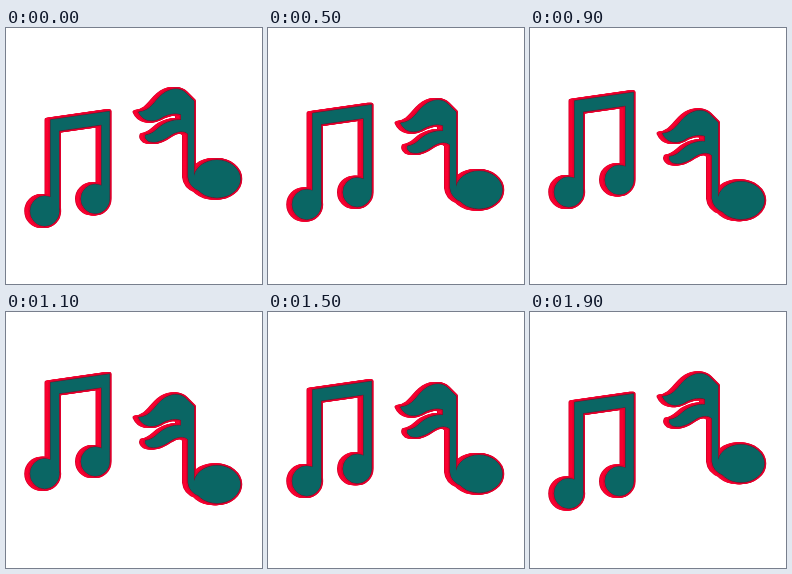
An HTML page with a canvas that plays this animation: 256 by 256 pixels, repeating every 2 s.

```html
<!DOCTYPE html>
<html lang="en">
<head>
<meta charset="utf-8">
<title>Bobbing notes</title>
<style>
  html, body { margin: 0; width: 100%; height: 100%; overflow: hidden; background: #fff; }
  canvas { display: block; width: 256px; height: 256px; }
</style>
</head>
<body>
<canvas id="stage" width="256" height="256"></canvas>
<script>
const ctx = document.getElementById('stage').getContext('2d');
const LOOP = 2000, STEP = 100, SWING = 11, DEPTH = 4;

function withHeads(outline, heads) {
  const path = new Path2D(outline);
  for (const [x, y, rx, ry] of heads) {
    path.moveTo(x + rx, y);
    path.ellipse(x, y, rx, ry, 0, 0, Math.PI * 2);
  }
  return path;
}

// Front faces, placed at the middle of their swing.
const beamed = withHeads(
  'M44.5 81.5 L103.6 73 V160 H95.5 V86.5 L53 92.5 V172 H44.5 Z',
  [[38.7, 172.7, 14.5, 15], [89.3, 160.5, 14.3, 14.6]]
);

const flagged = withHeads(
  `M132.5 95 C145 94 148 84 156 77.5 C164 71 174 70 180 76
   Q184 80 188 84 V160 L194 174 Q183 170 182 160 V117
   C178 113 171 114 165 118 C158 123 149 127 142 124
   Q138 121 139.5 118 C148 117 151 111 157 107.5
   C163 104 169 102.5 175 103 V97.5
   C167 95 160 98 154 101.5 C147 105 137 105 132.5 95 Z`,
  [[211, 161.9, 23.3, 18.9]]
);

function edge(path, color, dx) {
  ctx.save();
  ctx.translate(dx, 0);
  ctx.strokeStyle = color;
  ctx.stroke(path);
  ctx.restore();
}

// A face with a rim, extruded to the left.
function drawNote(path, y) {
  ctx.save();
  ctx.translate(0, y);
  ctx.lineJoin = 'round';
  ctx.lineWidth = 4;
  edge(path, '#cc0029', -DEPTH);
  for (let d = DEPTH - 0.7; d > 0; d -= 0.5) edge(path, '#fa0030', -d);
  edge(path, '#e0002c', 0);
  ctx.lineWidth = 1;
  edge(path, '#5a1a2c', 0);
  ctx.fillStyle = '#0a6664';
  ctx.fill(path);
  ctx.restore();
}

function swing(t, peak) {
  return SWING * Math.cos((t - peak) / LOOP * Math.PI * 2);
}

function frame(now) {
  const t = Math.floor(now % LOOP / STEP) * STEP;
  ctx.fillStyle = '#fff';
  ctx.fillRect(0, 0, 256, 256);
  drawNote(beamed, swing(t, 110));
  drawNote(flagged, swing(t, 1000));
  requestAnimationFrame(frame);
}

frame(0);
</script>
</body>
</html>
```
